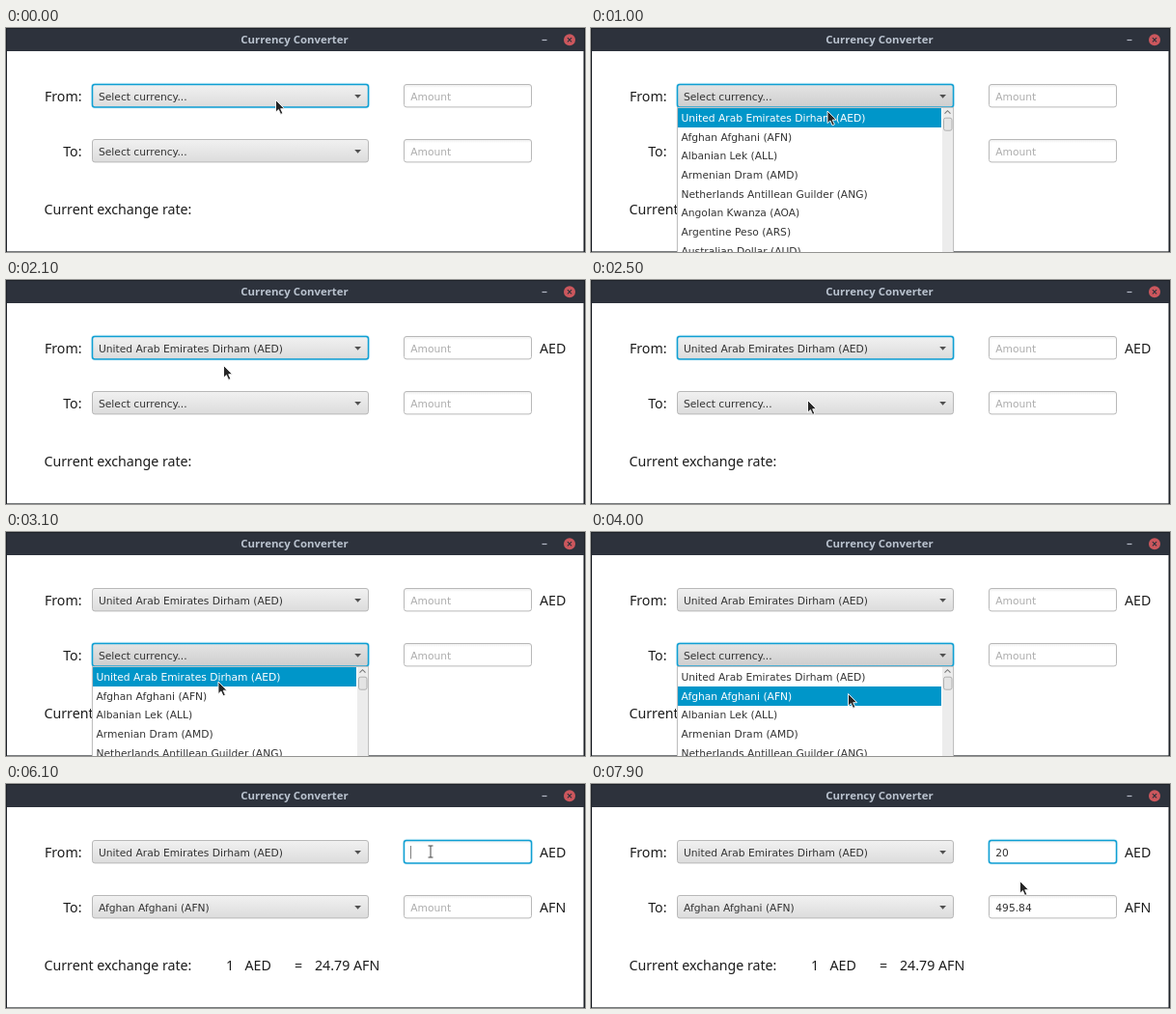
These frames come from a looping animation (600 by 232 pixels, 8000 ms). An HTML page:

```html
<!DOCTYPE html>
<html lang="en">
<head>
<meta charset="utf-8">
<title>Currency Converter</title>
<style>
html, body { margin: 0; width: 100%; height: 100%; overflow: hidden; background: #fff; }
svg { display: block; width: 600px; height: 232px; }
text { font: 10.7px "DejaVu Sans", sans-serif; fill: #333; }
.label { font: 14.2px "Noto Sans", sans-serif; fill: #1c1c1c; }
.title { font: bold 11.4px "Noto Sans", sans-serif; fill: #bac3cf; text-anchor: middle; }
.end { text-anchor: end; }
.prompt { fill: #adadad; }
.on { fill: #fff; }
.crisp { shape-rendering: crispEdges; }
</style>
</head>
<body>
<svg viewBox="0 0 600 232">
  <defs>
    <linearGradient id="face" x2="0" y2="1">
      <stop stop-color="#f1f1f1"/><stop offset="1" stop-color="#dcdcdc"/>
    </linearGradient>
    <linearGradient id="pressed" x2="0" y2="1">
      <stop stop-color="#e4e4e4"/><stop offset="1" stop-color="#cecece"/>
    </linearGradient>
    <linearGradient id="inset" x2="0" y2="1">
      <stop stop-color="#ececec"/><stop offset=".15" stop-color="#fff"/>
    </linearGradient>
  </defs>
  <rect width="600" height="232" fill="#1d2127"/>
  <rect x="1" y="1" width="598" height="23" fill="#2d323c"/>
  <rect x="1" y="24" width="597.5" height="207.4" fill="#fff"/>
  <text class="title" x="299" y="16.3">Currency Converter</text>
  <path d="M555.5 12.5h5" stroke="#b4bac6" stroke-width="1.2"/>
  <circle cx="584" cy="12.3" r="6" fill="#cc575d"/>
  <path d="M581.9 10.2l4.2 4.2m0-4.2l-4.2 4.2" stroke="#2d323c" stroke-width="1.2"/>
  <g id="scene"></g>
</svg>
<script>
const LOOP = 8000, STEP = 100, ROW = 19.7;
const FROM_Y = 58, TO_Y = 115, BOX_H = 24;
const AED = 'United Arab Emirates Dirham (AED)', AFN = 'Afghan Afghani (AFN)';
const CURRENCIES = [AED, AFN, 'Albanian Lek (ALL)', 'Armenian Dram (AMD)',
  'Netherlands Antillean Guilder (ANG)', 'Angolan Kwanza (AOA)',
  'Argentine Peso (ARS)', 'Australian Dollar (AUD)'];

// Pointer moves: start time, steps, end x, end y, upward bow of the path
const HOME = [279, 74];
const MOVES = [
  [100, 2, 247, 73, 60], [1000, 2, 242, 98], [1500, 1, 228, 104], [1600, 4, 225, 88],
  [2200, 4, 224, 124], [2900, 5, 217, 171], [4000, 1, 266, 167], [4100, 1, 573, 143],
  [4500, 3, 525, 149], [5200, 9, 440, 70, 55], [6500, 1, 463, 64], [7900, 1, 444, 100]];

const scene = document.getElementById('scene');
const smooth = k => k * k * (3 - 2 * k);

function pointerAt(t) {
  let [x, y] = HOME;
  for (const [start, steps, endX, endY, bow = 0] of MOVES) {
    if (t < start) break;
    const k = smooth(Math.min(1, ((t - start) / STEP + 1) / steps));
    x += (endX - x) * k;
    y += (endY - y) * k - bow * Math.sin(Math.PI * k);
  }
  return [x, y];
}

const text = (x, y, str, cls = '') => `<text class="${cls}" x="${x}" y="${y}">${str}</text>`;
const label = (x, y, str, cls = '') => text(x, y, str, 'label ' + cls);
const rect = (x, y, w, h, attrs) => `<rect x="${x}" y="${y}" width="${w}" height="${h}" ${attrs}/>`;

function box(x, y, w, fill, focused) {
  const glow = rect(x - .5, y - .5, w + 1, BOX_H + 1.4,
    'rx="3.5" fill="none" stroke="#039ed3" stroke-opacity=".15" stroke-width="1.4"');
  const line = focused ? 'stroke="#0f9fd3" stroke-width="1.5"' : 'stroke="#b8b8b8"';
  return (focused ? glow : '')
    + rect(x + .5, y + .5, w - 1, BOX_H - .6, `rx="2.5" fill="url(#${fill})" ${line}`);
}

const combo = (y, value, focused, open) => box(89, y, 287, open ? 'pressed' : 'face', focused)
  + text(96, y + 16.7, value)
  + `<path d="M361.2 ${y + 11}h6.8l-3.4 3.8z" fill="#505050"/>`;

const field = (y, value, focused) => box(412, y, 133, 'inset', focused)
  + (value || focused ? text(419.3, y + 16.7, value) : text(419.3, y + 16.7, 'Amount', 'prompt'));

function popup(boxY, [x, y]) {
  const top = boxY + BOX_H + 1.2;
  const hover = x > 376 ? 1 : Math.floor((y - top) / ROW);
  const rows = CURRENCIES.map((name, i) => {
    const rowY = top + i * ROW, on = i === hover;
    return (on ? rect(90, rowY, 273, ROW, 'class="crisp" fill="#0096c9"') : '')
      + text(93.5, rowY + 13.7, name, on ? 'on' : '');
  });
  return rect(88.5, top, 288, 160, 'fill="#000" opacity=".06"')
    + rect(89.5, top - .8, 286, 160, 'fill="#fff" stroke="#c0c0c0"')
    + rows.join('')
    + rect(364, top, 11, 160, 'class="crisp" fill="#ececec"')
    + `<path d="M366.5 ${top + 5.5}l3-3 3 3" fill="none" stroke="#777" stroke-width="1.1"/>`
    + rect(365.5, top + 10, 8.5, 13, 'rx="2" fill="#e4e4e4" stroke="#b0b0b0"');
}

const arrow = (x, y) => `<path transform="translate(${x} ${y})"
  d="M.5.5V13.2L3.4 10.5 5.6 15.4 7.9 14.4 5.7 9.7H9.6z" fill="#262626" stroke="#fff" stroke-width=".9"/>`;

function beam(x, y) {
  const d = `M${x - 2.5} ${y - 6}h5m-2.5 0v12m-2.5 0h5`;
  return `<path d="${d}" fill="none" stroke="#fff" stroke-width="2.4"/>
    <path d="${d}" fill="none" stroke="#444"/>`;
}

function draw(t) {
  const during = (a, b) => t >= a && t < b;
  const pointer = pointerAt(t), [x, y] = pointer;
  const fromOpen = during(500, 2100), toOpen = during(2800, 5000);
  const amount = '20'.slice(0, Math.max(0, t / STEP - 70));
  const result = amount && (amount * 24.792).toFixed(2);
  const overField = x > 412 && x < 545
    && [FROM_Y, TO_Y].some(top => y > top && y < top + BOX_H);

  let out = label(78.5, 75.7, 'From:', 'end') + label(78.5, 132.7, 'To:', 'end')
    + label(39.5, 193, 'Current exchange rate:')
    + combo(FROM_Y, t < 2100 ? 'Select currency...' : AED, t < 2800, fromOpen)
    + combo(TO_Y, t < 5000 ? 'Select currency...' : AFN, during(2800, 6100), toOpen)
    + field(FROM_Y, amount, t >= 6100) + field(TO_Y, result, false);

  if (t >= 2100) out += label(553, 75.7, 'AED');
  if (t >= 5000) {
    out += label(553, 132.7, 'AFN') + label(228, 193, '1') + label(247.5, 193, 'AED')
      + label(299, 193, '=') + label(320, 193, '24.79') + label(360, 193, 'AFN');
  }
  if (during(6100, 6700) || during(7100, 7700)) {
    out += rect(419 + amount.length * 6.8, 64, 1, 13.5, 'fill="#808080"');
  }
  if (fromOpen) out += popup(FROM_Y, pointer);
  if (toOpen) out += popup(TO_Y, pointer);

  scene.innerHTML = out + (overField ? beam(x, y) : arrow(x, y));
}

const start = performance.now();
let shown = -1;
function tick() {
  const t = Math.floor((performance.now() - start) % LOOP / STEP) * STEP;
  if (t !== shown) draw(shown = t);
  requestAnimationFrame(tick);
}
tick();
</script>
</body>
</html>
```
